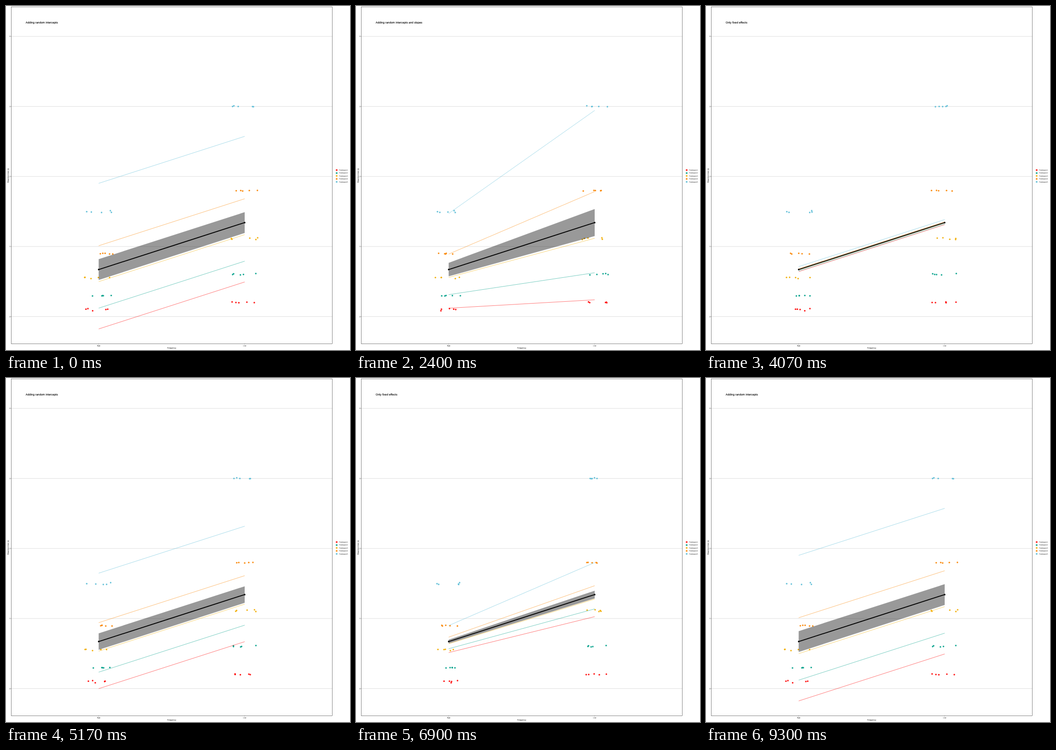
Animation, 748 px wide and 748 px high, one loop 10000 ms. Source, as an HTML page:

```html
<!DOCTYPE html>
<html lang="en">
<head>
<meta charset="utf-8">
<title>Mixed models</title>
<style>
  html, body { margin: 0; width: 100%; height: 100%; overflow: hidden; background: #fff; }
  svg { display: block; width: 748px; height: 748px; }
  text { font-family: "Liberation Sans", Arial, sans-serif; text-rendering: geometricPrecision; fill: #000; }
</style>
</head>
<body>
<svg id="plot" viewBox="0 0 748 748"></svg>
<script>
const FPS = 30, HALF = 150, LOOP = 10000;
const SIDES = [{ name: 'High', x: 201.5 }, { name: 'Low', x: 519 }];
const JITTER = 31, NOISE = 0.02, TRIALS = 5;

// Reaction time at high frequency; it doubles at low frequency
const PEOPLE = [
  { rt: 0.1, color: '#ff0000' },
  { rt: 0.3, color: '#00a08a' },
  { rt: 0.555, color: '#f2ad00' },
  { rt: 0.9, color: '#f98400' },
  { rt: 1.5, color: '#5bbcd6' }
];
const MEAN = PEOPLE.reduce((sum, p) => sum + p.rt, 0) / PEOPLE.length;

// gain: weight of a participant's effect on the high and low side
const STATES = [
  { title: 'Adding random intercepts', gain: [1.485, 1.485] },
  { title: 'Adding random intercepts and slopes', gain: [1, 2] },
  { title: 'Only fixed effects', gain: [0, 0] }
];
const LEGS = [
  { from: 0, to: 1, start: 20, end: 50 },
  { from: 1, to: 2, start: 71, end: 100 },
  { from: 2, to: 0, start: 121, end: 150 }
];

const svg = document.getElementById('plot');
const yOf = value => 675.3 - 152.3 * value;
const fixed = side => MEAN * (side + 1);

let seed = 7;
function random() {
  seed = (seed * 16807) % 2147483647;
  return seed / 2147483647;
}
const spread = size => (random() * 2 - 1) * size;

function set(el, attrs) {
  for (const key in attrs) el.setAttribute(key, attrs[key]);
}
function add(tag, attrs, text) {
  const el = document.createElementNS('http://www.w3.org/2000/svg', tag);
  set(el, attrs);
  if (text) el.textContent = text;
  return svg.appendChild(el);
}
const line = (x1, y1, x2, y2, stroke, width) =>
  add('line', { x1, y1, x2, y2, stroke, 'stroke-width': width });
const dot = (cx, cy, fill) => add('circle', { cx, cy, r: 1.75, fill });
const label = (x, y, size, text, anchor = 'middle') =>
  add('text', { x, y, 'font-size': size, 'text-anchor': anchor }, text);

// Axes and grid
for (let v = 0; v <= 4; v++) {
  const y = yOf(v);
  line(11.5, y, 709.5, y, '#cdcdcd', 0.65);
  line(10.2, y, 11.5, y, '#333', 0.5);
  label(9.4, y + 1.3, 3.6, String(v), 'end');
}
for (const { name, x } of SIDES) {
  line(x, 734.5, x, 735.8, '#333', 0.5);
  label(x, 740, 3.7, name);
}
label(360.3, 745.2, 4.15, 'Frequency');
set(label(0, 0, 4.2, 'Reaction time (s)'), { transform: 'translate(5.5 368.5) rotate(-90)' });

// Legend
PEOPLE.forEach(({ color }, i) => {
  const y = 356.7 + 6.45 * i;
  line(716.5, y, 721.5, y, color, 0.5);
  dot(719, y, color);
  label(724.5, y + 1.2, 3.42, 'Participant ' + (i + 1), 'start');
});

// Moving parts
const trials = [];
for (const { rt, color } of PEOPLE) {
  SIDES.forEach(({ x }, side) => {
    for (let i = 0; i < TRIALS; i++) {
      const el = dot(x, yOf(rt * (side + 1) + spread(NOISE) * random()), color);
      set(el, { opacity: 0.9 });
      trials.push({ el, x: STATES.map(() => x + spread(JITTER)) });
    }
  });
}
const ribbon = add('polygon', { fill: '#000', 'fill-opacity': 0.4 });
const fits = PEOPLE.map(({ rt, color }) => ({
  el: line(SIDES[0].x, 0, SIDES[1].x, 0, color, 0.55),
  effect: rt - MEAN
}));
line(SIDES[0].x, yOf(fixed(0)), SIDES[1].x, yOf(fixed(1)), '#000', 2);
SIDES.forEach(({ x }, side) => dot(x, yOf(fixed(side)), '#000'));
const title = label(42.8, 38.1, 6.15, '', 'start');
set(title, { stroke: '#000', 'stroke-width': 0.1 });
add('rect', { x: 11.5, y: 2, width: 698, height: 732.5, fill: 'none', stroke: '#333', 'stroke-width': 0.6 });

function draw(frame) {
  const { from, to, start, end } = LEGS.find(leg => frame <= leg.end);
  const k = Math.max(0, (frame - start) / (end - start));
  const mix = values => values[from] + (values[to] - values[from]) * k;
  const gain = SIDES.map((_, side) => mix(STATES.map(s => s.gain[side])));
  const fitY = (effect, side) => yOf(fixed(side) + effect * gain[side]);

  for (const { el, x } of trials) set(el, { cx: mix(x) });
  for (const { el, effect } of fits) set(el, { y1: fitY(effect, 0), y2: fitY(effect, 1) });

  const edge = [[0, 0.1], [1, 0.1], [1, -0.1], [0, -0.1]];
  set(ribbon, { points: edge.map(([side, e]) => [SIDES[side].x, fitY(e, side)]).join(' ') });
  title.textContent = STATES[k < 0.5 ? from : to].title;
}

// Steps fall on 10 ms ticks; the second half plays backwards
function frameAt(ms) {
  const tick = Math.floor((ms % LOOP) / 10) * 10;
  const n = Math.floor((tick + 5) * FPS / 1000);
  return n < HALF ? n : 2 * HALF - 1 - n;
}

const begin = performance.now();
let shown = -1;
function play() {
  const frame = frameAt(performance.now() - begin);
  if (frame !== shown) draw(shown = frame);
  requestAnimationFrame(play);
}
play();
</script>
</body>
</html>
```
